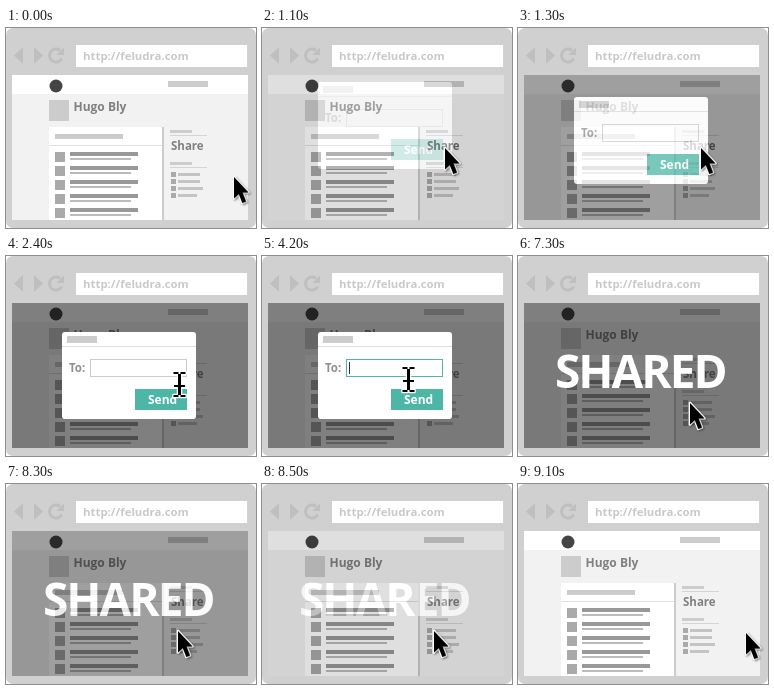
Animation, 250 px wide and 200 px high, one loop 9300 ms. Source, as an HTML page with a canvas:

```html
<!DOCTYPE html>
<html lang="en">
<head>
<meta charset="utf-8">
<title>Share dialog</title>
<style>
  html, body { margin: 0; width: 100%; height: 100%; overflow: hidden; background: #fff; }
  canvas { display: block; }
</style>
</head>
<body>
<canvas id="stage" width="250" height="200"></canvas>
<script>
const LOOP = 9300, STEP = 100;
const TEAL = '#4db6a6', TEAL_DARK = '#3b978a';
let ctx = document.getElementById('stage').getContext('2d');

function rect(x, y, w, h, color) {
  ctx.fillStyle = color;
  ctx.fillRect(x, y, w, h);
}

function roundRect(x, y, w, h, r, color) {
  ctx.fillStyle = color;
  ctx.beginPath();
  ctx.roundRect(x, y, w, h, r);
  ctx.fill();
}

function polygon(points, color) {
  ctx.fillStyle = color;
  ctx.beginPath();
  points.forEach(([x, y]) => ctx.lineTo(x, y));
  ctx.closePath();
  ctx.fill();
}

function text(str, x, y, size, color) {
  ctx.font = `700 ${size}px "Open Sans", "Noto Sans", sans-serif`;
  ctx.fillStyle = color;
  ctx.fillText(str, x, y);
}

// Paints several shapes as one layer, then blends that layer in
function group(opacity, dy, paint) {
  if (opacity <= 0) return;
  const outer = ctx;
  const layer = Object.assign(document.createElement('canvas'), { width: 250, height: 200 });
  ctx = layer.getContext('2d');
  paint();
  ctx = outer;
  ctx.globalAlpha = opacity;
  ctx.drawImage(layer, 0, dy);
  ctx.globalAlpha = 1;
}

const ramp = (t, from, to) => Math.min(1, Math.max(0, (t - from) / (to - from)));

function drawBrowser() {
  const icon = '#bfbfbf';
  rect(0, 0, 250, 200, '#fff');
  roundRect(0, 0, 250, 200, 7, '#d0d0d0');
  polygon([[8, 27.5], [17, 19], [17, 36]], icon);
  polygon([[37, 27.5], [28, 19], [28, 36]], icon);
  ctx.strokeStyle = icon;
  ctx.lineWidth = 3;
  ctx.beginPath();
  ctx.arc(50, 27.5, 6.5, 0.5, 5.4);
  ctx.stroke();
  polygon([[58, 19.5], [58, 27], [50.5, 27]], icon);
  rect(70, 17, 171, 22, '#fff');
  text('http://feludra.com', 77, 32, 11.4, '#c9c9c9');
}

function drawPage(hover) {
  rect(6, 47, 236, 145, '#f2f2f2');
  rect(6, 47, 236, 19, '#fff');
  ctx.fillStyle = '#444';
  ctx.beginPath();
  ctx.arc(50, 58, 6.5, 0, Math.PI * 2);
  ctx.fill();
  rect(162, 53, 40, 6, '#ccc');

  rect(43, 72, 20, 21, '#ccc');
  text('Hugo Bly', 67.5, 83, 12, '#808080');

  rect(43, 99, 113, 93, '#fff');
  rect(156, 99, 2, 93, '#ccc');
  rect(49, 106, 68, 5, '#ccc');
  rect(43, 117, 113, 1, '#e0e0e0');
  for (let y = 124; y < 192; y += 14) {
    rect(49, y, 10, 10, '#aaa');
    rect(64, y, 68, 4, '#999');
    rect(64, y + 6, 61, 2, '#bbb');
  }

  for (const y of [102, 134]) {
    rect(164, y, 22, 3, '#ccc');
    rect(164, y + 5, 37, 1, '#d4d4d4');
  }
  text('Share', 165, 122, 11.5, hover ? '#686868' : '#808080');
  [22, 22, 25, 19].forEach((w, i) => {
    rect(165, 144 + i * 7, 5, 5, '#aaa');
    rect(172, 145 + i * 7, w, 3, '#c4c4c4');
  });
}

function drawDialog(t) {
  const typed = 'Mom'.slice(0, t < 4700 ? 0 : t < 4900 ? 1 : t < 5100 ? 2 : 3);
  const caretStart = t < 4700 ? 3200 : 4800;
  const caretOn = t >= 3200 &&
    (t >= 4700 && t < 5300 || Math.floor((t - caretStart) / 500) % 2 === 0);

  roundRect(56, 76, 134, 87, 3, '#fff');
  rect(61, 80, 30, 7, '#ccc');
  rect(56, 90, 134, 1, '#ddd');
  text('To:', 63, 116, 11.5, '#909090');
  ctx.strokeStyle = t >= 3000 ? TEAL : '#ccc';
  ctx.lineWidth = 1;
  ctx.strokeRect(84.5, 103.5, 96, 17);
  text(typed, 87, 116, 11.3, '#555');
  if (caretOn) rect([87, 97, 105, 115][typed.length], 106, 1, 12, '#333');
  rect(129, 133, 52, 21, t >= 6800 ? TEAL_DARK : TEAL);
  text('Send', 142, 148, 12, '#fff');
}

function drawSharedTitle() {
  ctx.letterSpacing = '-2px';
  text('SHARED', 37, 132, 46, '#fff');
}

function strokeAndFill(path) {
  ctx.lineJoin = 'round';
  ctx.strokeStyle = '#fff';
  ctx.lineWidth = 2.6;
  ctx.stroke(path);
  ctx.fillStyle = '#000';
  ctx.fill(path);
}

function drawArrow() {
  ctx.shadowColor = 'rgba(0,0,0,0.35)';
  ctx.shadowBlur = 2;
  ctx.shadowOffsetX = ctx.shadowOffsetY = 1;
  strokeAndFill(new Path2D('M2 3V24.5L6.8 20L10.3 29L14 27.5L10.5 18.5H16.5Z'));
}

function drawBeam() {
  const path = new Path2D();
  path.rect(-1, -10, 3, 21);
  path.rect(-5, 1, 11, 2);
  for (const side of [-1, 1]) {
    path.rect(0.5 + side * 3.5 - 2.5, -12, 5, 2);
    path.rect(0.5 + side * 3.5 - 2.5, 11, 5, 2);
  }
  strokeAndFill(path);
}

// Pointer legs: start time, end time, destination
const LEGS = [
  [0, 600, 181, 117],
  [2300, 2700, 145, 110.3],
  [6200, 6600, 170, 143.5],
  [8700, 9100, 226, 146]
];

function drawPointer(t) {
  let x = 226, y = 146;
  for (const [from, to, toX, toY] of LEGS) {
    const p = ramp(t, from, to);
    x += (toX - x) * p;
    y += (toY - y) * p;
  }
  const overField = t >= 2400 && t < 6400;
  ctx.save();
  if (overField) {
    ctx.translate(Math.round(x + 1), Math.round(y + 13));
    drawBeam();
  } else {
    ctx.translate(Math.round(x), Math.round(y));
    drawArrow();
  }
  ctx.restore();
}

function draw(t) {
  const open = ramp(t, 1000, 1400);
  const sent = ramp(t, 6900, 7300);
  const close = ramp(t, 8200, 8600);

  drawBrowser();
  ctx.save();
  ctx.beginPath();
  ctx.rect(6, 47, 236, 145);
  ctx.clip();
  drawPage(t >= 600 && t < 1400);
  ctx.restore();

  group(open - close, 0, () => {
    rect(6, 47, 236, 145, 'rgba(0,0,0,0.5)');
    group(1 - sent, Math.round(-29 * (1 - open + sent)), () => drawDialog(t));
    group(sent, 0, drawSharedTitle);
  });
  drawPointer(t);
}

const start = performance.now();
function tick() {
  const t = (performance.now() - start) % LOOP;
  draw(Math.floor(t / STEP) * STEP);
  requestAnimationFrame(tick);
}
tick();
</script>
</body>
</html>
```
